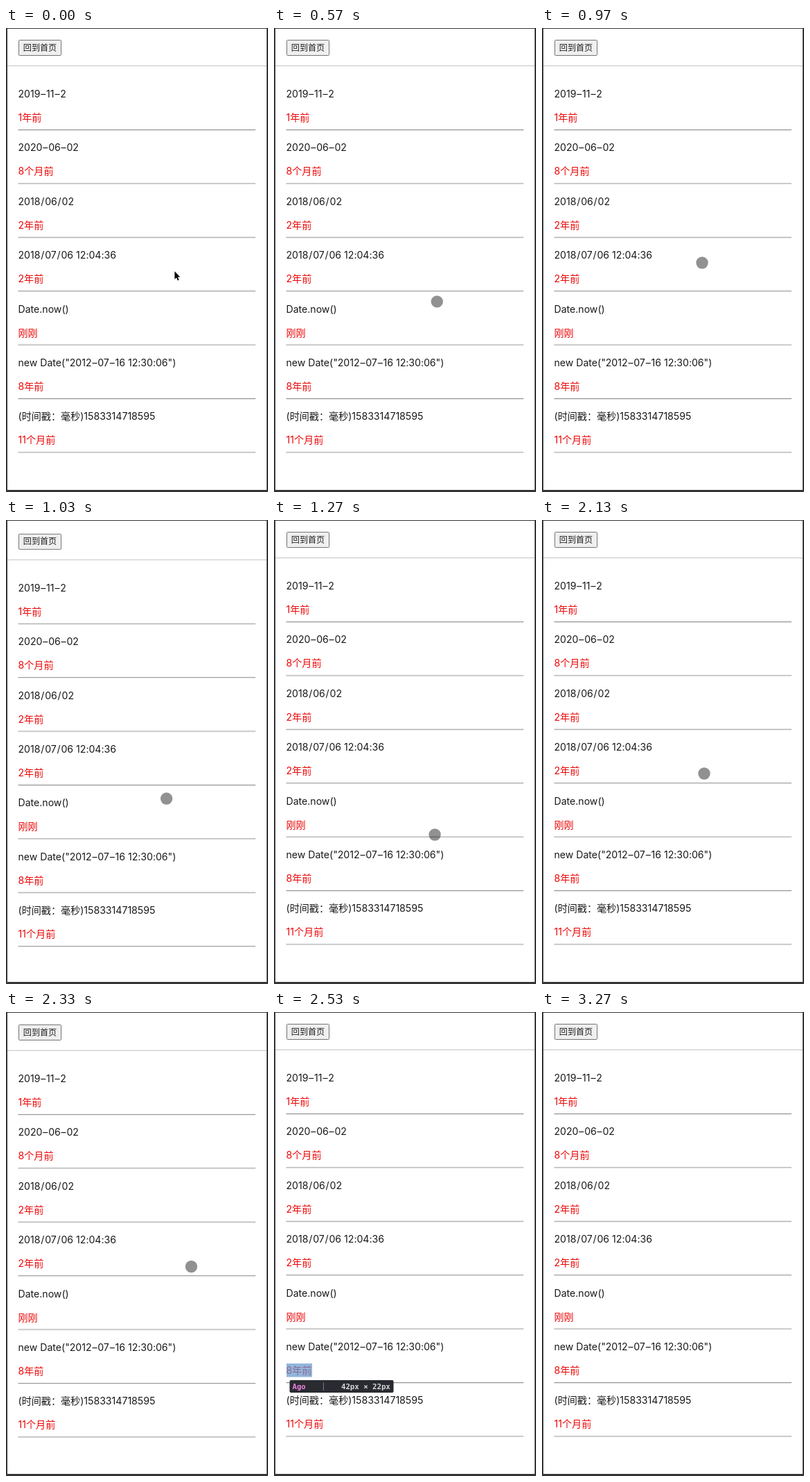
Recreate the animation shown at these times as an HTML page. Size 378x668 px, loop 3.91 s.

```html
<!DOCTYPE html>
<html lang="zh-CN">
<head>
<meta charset="utf-8">
<title>Ago</title>
<style>
html, body { margin: 0; width: 100%; height: 100%; overflow: hidden; background: #fff; }
svg { display: block; width: 378px; height: 668px; }
text { font: 14.1px Inter, "Noto Sans CJK SC", "Noto Sans CJK", sans-serif; font-feature-settings: "calt" 0; fill: #181818; white-space: pre; }
.ago { fill: #ec0606; }
.btn { font-size: 12.1px; fill: #222; }
.tip text { font: bold 10.7px "DejaVu Sans Mono", monospace; fill: #d9d9d9; }
.tip .tag { fill: #ee7fdf; }
</style>
</head>
<body>
<svg viewBox="0 0 378 668">
  <rect width="378" height="668" fill="#353538"/>
  <rect x="2" y="1" width="374" height="664" fill="#fff"/>
  <g id="page">
    <rect x="2" y="54" width="374" height="1" fill="#c3c3c3"/>
    <rect x="18.5" y="17.5" width="61" height="22" rx="1" fill="#efefef" stroke="#747474"/>
    <text class="btn" x="24.8" y="32.6">回到首页</text>
    <g id="rows"></g>
  </g>
  <g id="tip" class="tip">
    <rect x="18" y="506" width="37" height="19.5" fill="#6497cd" fill-opacity=".7"/>
    <rect x="22.5" y="530" width="150" height="18" rx="2" fill="#292b31"/>
    <text class="tag" x="26.5" y="542.8">Ago</text>
    <rect x="71" y="533.5" width="1" height="11.5" fill="#777a80"/>
    <text x="97" y="542.8">42px × 22px</text>
  </g>
  <path id="arrow" d="M243.3 350.3v11.4l2.6-2.4 1.8 4.2 1.9-.8-1.8-4.1h3.5z" fill="#080808" stroke="#fff" stroke-width=".8" paint-order="stroke"/>
  <circle id="touch" r="8.7" fill="#000" fill-opacity=".43"/>
</svg>
<script>
const LOOP = 3910, STEP = 100 / 3, PITCH = 77.4;
const $ = id => document.getElementById(id);

const rows = [
  ["2019–11–2", "1年前"],
  ["2020–06–02", "8个月前"],
  ["2018/06/02", "2年前"],
  ["2018/07/06 12:04:36", "2年前"],
  ["Date.now()", "刚刚"],
  ['new Date("2012–07–16 12:30:06")', "8年前"],
  ["(时间戳：毫秒)1583314718595", "11个月前"]
];
// a little air around separators
const airy = s => s.replace(/([\/–])(.)/g, '<tspan dx=".8">$1</tspan><tspan dx=".8">$2</tspan>');

$("rows").innerHTML = rows.map(([date, ago], i) => `
  <g transform="translate(0 ${(i * PITCH).toFixed(2)})">
    <text x="17.5" y="100">${airy(date)}</text>
    <text class="ago" x="17.5" y="134">${ago}</text>
    <rect x="17.5" y="146" width="342.5" height="1" fill="#949494"/>
    <rect x="17.5" y="147" width="342.5" height=".8" fill="#dedede"/>
  </g>`).join("");

const part = (t, from, to) => Math.min(1, Math.max(0, (t - from) / (to - from)));
const easeOut = p => 1 - (1 - p) ** 3.35;
const easeIn = p => p * p;
const easeBoth = p => (1 - Math.cos(Math.PI * p)) / 2;
const bump = p => Math.sin(Math.PI * p);

// pointer position: each move adds its own share
function pointer(t) {
  const settle = part(t, 470, 830);
  const pull = easeOut(part(t, 970, 1270));
  const push = easeBoth(part(t, 1730, 2130));
  const leave = easeIn(part(t, 2233, 2450));
  return {
    x: 243 - 12 * easeOut(settle) + pull + 2 * push + 156 * leave,
    y: 358 - 20 * settle + 48 * Math.sin(2 * Math.PI * settle) * (1 - settle / 2)
       + 115 * pull - 88 * push + 7 * leave
  };
}

// the page gives a little while it is dragged
const stretch = t => 2.8 * bump(Math.sqrt(part(t, 970, 1270)))
  - bump(part(t, 1760, 2070)) + bump(part(t, 2233, 2400));

const show = (id, on) => $(id).setAttribute("visibility", on ? "visible" : "hidden");

function draw(ms) {
  const t = Math.floor((ms % LOOP + 3.4) / STEP) * STEP;
  const { x, y } = pointer(t);
  $("touch").setAttribute("cx", x);
  $("touch").setAttribute("cy", y);
  $("page").setAttribute("transform", `translate(0 ${stretch(t)})`);
  show("arrow", t < 466);
  show("touch", t >= 466 && t < 2450);
  show("tip", t >= 2499 && t < 2660);
}

const start = performance.now();
function tick() {
  draw(performance.now() - start);
  requestAnimationFrame(tick);
}
tick();
</script>
</body>
</html>
```
